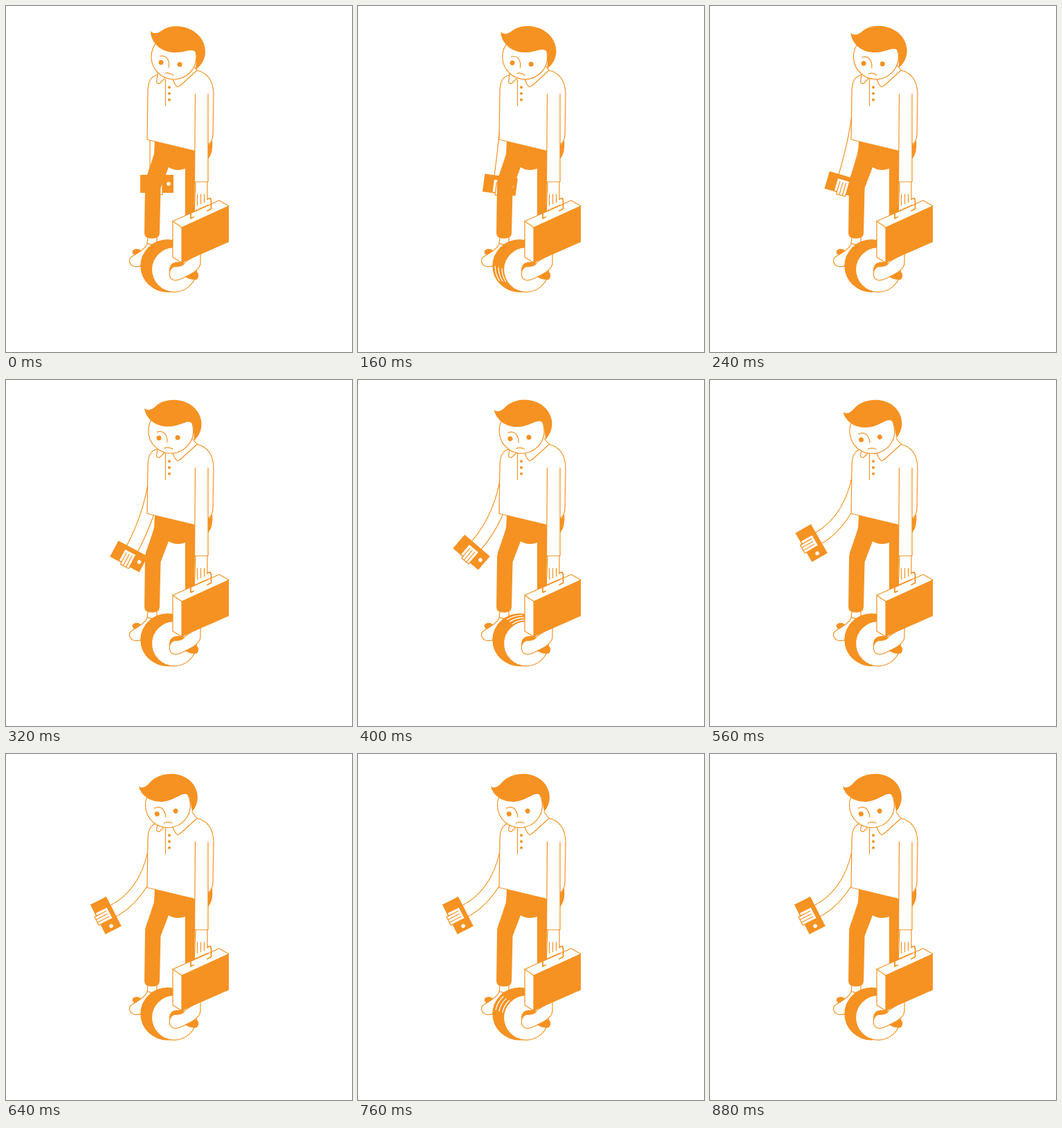
Animation of 500 by 500 pixels, one loop 920 ms. Source, as an HTML page:

```html
<!DOCTYPE html>
<html lang="en">
<head>
<meta charset="utf-8">
<title>Unicycle commuter</title>
<style>
  html, body { margin: 0; width: 100%; height: 100%; overflow: hidden; background: #fff; }
  svg { display: block; width: 100%; height: 100%; }
  .line { fill: none; stroke: #f59222; }
  .paper { fill: #fff; stroke: #f59222; }
  .ink { fill: #f59222; }
  #tread { fill: none; stroke: #fff; stroke-width: 1.3; }
</style>
</head>
<body>
<svg viewBox="0 0 500 500" stroke-width="1.2" stroke-linejoin="round" stroke-linecap="round">
  <!-- swinging arm with phone, behind the body -->
  <path id="arm" class="paper"/>
  <g id="phone">
    <rect class="ink" x="-24" y="-13" width="48" height="26"/>
    <circle cx="17" r="2.8" fill="#fff"/>
    <path class="paper" d="M-10 -7H8V15.500H-5.500V12H-10Z"/>
    <path class="line" d="M-5.500 -3V12M-1 -3V15M3.500 -3V15"/>
  </g>

  <!-- legs and far foot -->
  <path class="ink" d="M292 201Q297 198 298 193Q300 212 292 221Z"/>
  <ellipse class="ink" cx="189" cy="355.500" rx="6.500" ry="4.500"/>
  <path class="paper" d="M205 334L204 344C201 351 191 357 182 362C176 366 178 373 184 376C192 378 200 375 204 368L218 345V334Z"/>
  <path class="line" d="M204 343Q211 346 218 344"/>
  <path class="ink" d="M215 194L273 209V305H259V235Q246 240 235 233L223.500 263L222 328Q222 336 211 336Q200 336 200 328L201 255Q202 248 205 241L214 214Z"/>

  <!-- wheel -->
  <ellipse class="ink" cx="234" cy="375.500" rx="39.800" ry="38.300"/>
  <path id="tread"/>
  <ellipse class="paper" cx="243" cy="381" rx="32.500" ry="32.300"/>
  <path class="ink" d="M258 391L275 383Q281 389 276 395Q268 397 258 391Z"/>
  <path class="ink" d="M236 384Q235 371 247 370L257 370L256 375L240 386Z"/>
  <path class="paper" d="M281 356V371C281 381 268 387 258 392C249 397 241 398 238 393C234 386 237 378 244 376.500C250 376 255 377 259 370Z"/>

  <!-- shirt and near arm -->
  <path class="paper" d="M218 100C208 102 205 111 205 124L204 193L273 209.500L292 200Q299 196 299 185L300 128C300 107 290 96 276 93L262 85H230Z"/>
  <path class="line" d="M230.500 106V144"/>
  <g class="ink"><circle cx="236" cy="117.500" r="2"/><circle cx="236" cy="126.500" r="2"/><circle cx="236" cy="135.500" r="2"/></g>
  <path class="paper" d="M219 99L217.500 110Q219 114 223 111L229 105M241 106Q245 116 248 117Q251 116 254 113L276 93L269 84"/>

  <!-- briefcase -->
  <path class="paper" d="M241 311L308 281L322 289L254 320V371L241 363Z"/>
  <path class="ink" d="M254 320L322 289V341L254 371Z"/>
  <path class="line" d="M241 311L254 320"/>
  <path class="line" stroke-width="1.800" d="M271 305L267 307V299L292 288"/>
  <path fill="#fff" d="M273 253H291.500V282L272 291Z"/>
  <path class="line" d="M274 254L272.500 291M291 254V280M276.500 272V288M281.500 272V286M286.500 272V284"/>
  <path class="line" stroke-width="1.800" d="M291 279L294 278Q296.500 278 296.500 282V293L291 296"/>
  <path fill="#fff" d="M273 127H292V254H273Z"/>
  <path class="line" d="M273.500 127L272.500 254H292V127"/>

  <g id="head">
    <circle class="paper" cx="242.500" cy="73.500" r="32.500"/>
    <path class="ink" d="M209 36C213 41 219 40 226 35C236 28 251 28 262 32C279 38 288 52 288 66C288 78 281 87 274 92L275.500 71Q275 64 267 64C258 65 252 68 240 67C222 65 209 52 209 36Z"/>
    <circle class="ink" cx="224" cy="81.500" r="3.500"/>
    <circle class="ink" cx="251" cy="84.500" r="3.500"/>
    <path class="line" d="M222.500 72.500C232 70.500 237 78 235 89M230 97Q236 95.500 241.500 100"/>
  </g>
</svg>
<script>
const LOOP = 920, STEP = 40, SWING = 640, TURN = 320;
const el = id => document.getElementById(id);
const rad = deg => deg * Math.PI / 180;

function drawArm(p) {
  const x = 218 - 88.3 * p + 14.6 * p * p;
  const y = 257 + 15.7 * p - 39.4 * p * p;
  const angle = 49 * p + 14 * p * p;
  const c = Math.cos(rad(angle)), s = Math.sin(rad(angle));
  const at = (u, v) => `${x + u * c - v * s} ${y + u * s + v * c}`;
  el('phone').setAttribute('transform', `translate(${x} ${y}) rotate(${angle})`);
  el('arm').setAttribute('d',
    `M208 125C${208 - 6 * p} 165 ${at(-10, -52)} ${at(-10, -12)}` +
    `L${at(8, -12)}C${at(8, -45)} ${226 - 4 * p} 178 226 125`);
}

// Three grooves lie between the tyre's outer rim and its face.
function drawTread(t) {
  const mid = 344 - 360 * (t % TURN) / TURN;
  let d = '';
  for (const k of [.25, .55, .85]) {
    const rx = 39.8 - 7.3 * k, ry = 38.3 - 6 * k;
    const at = a => `${234 + 9 * k + rx * Math.cos(rad(a))} ${375.5 + 5.5 * k + ry * Math.sin(rad(a))}`;
    d += `M${at(mid - 17)}A${rx} ${ry} 0 0 1 ${at(mid + 17)}`;
  }
  el('tread').setAttribute('d', d);
}

function render(now) {
  const t = Math.floor(now % LOOP / STEP) * STEP;
  const p = (1 - Math.cos(Math.PI * Math.min(t / SWING, 1))) / 2;
  drawArm(p);
  drawTread(t);
  el('head').setAttribute('transform', `rotate(${-15.5 * p} 240 105)`);
  requestAnimationFrame(render);
}
render(performance.now());
</script>
</body>
</html>
```
